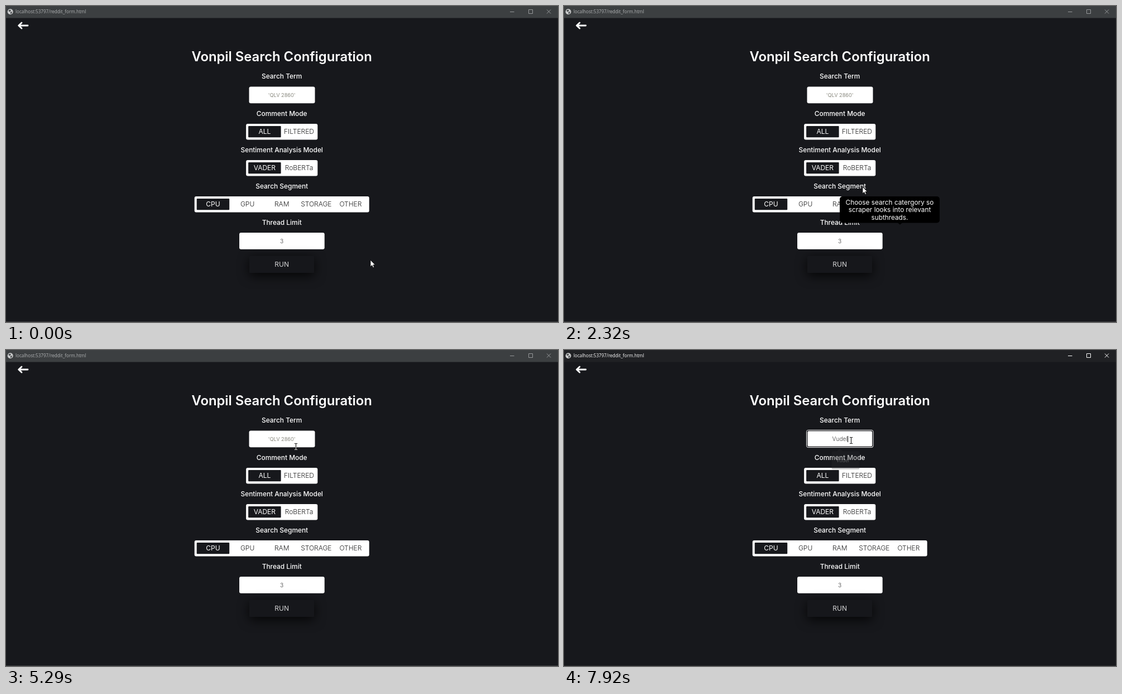
Write an HTML page that moves like this. It is 989 px wide and 566 px high and loops after 8000 ms.

```html
<!DOCTYPE html>
<html lang="en">
<head>
<meta charset="utf-8">
<title>Search form</title>
<style>
  html, body { margin: 0; width: 100%; height: 100%; overflow: hidden; background: #17181c; }
  svg { display: block; width: 100%; height: 100%; }
  text { font: 12px Inter, sans-serif; fill: #fff; text-anchor: middle; white-space: pre; }
  .title { font-size: 23.8px; font-weight: 600; }
  .label { font-weight: 500; font-size: 11.9px; }
  .option { font-weight: 300; fill: #222; }
  .hint { font-size: 9.2px; fill: #89897f; }
  .value { font-size: 10px; fill: #666; }
  .tip text { font-size: 11.8px; }
  .system, .popup text { font: 500 8.1px "Open Sans", sans-serif; text-anchor: start; }
  .popup text { font-size: 8.7px; fill: #f4f5f6; }
  .popup { filter: drop-shadow(0 1px 1px #0004); }
  .run { filter: drop-shadow(0 5px 10px #000c); }
  #beam { mix-blend-mode: difference; }
</style>
</head>
<body>
<svg id="stage" viewBox="0 0 989 566"></svg>
<script>
const LOOP = 8000, CENTER = 494.2, DARK = '#17181c', FOCUS = 5610, BLINK = 510;

const rect = (x, y, w, h, fill, r = 0, extra = '') =>
  `<rect x="${x}" y="${y}" width="${w}" height="${h}" rx="${r}" fill="${fill}" ${extra}/>`;
const text = (x, y, content, cls = '') => `<text x="${x}" y="${y}" class="${cls}">${content}</text>`;

// Segmented control whose first option is selected.
function choice(y, names) {
  const pitch = 61.6, width = pitch * names.length + 5, left = CENTER - width / 2;
  return rect(left, y, width, 28.5, '#fff', 3) +
    rect(left + 4, y + 4, 58.5, 20.2, DARK, 1) +
    names.map((name, i) => text(left + 33.3 + pitch * i, y + 18.2, name, i ? 'option' : '')).join('');
}

function tooltip(y, lines) {
  const height = 6.8 + 13.55 * lines.length;
  return `<g class="tip" visibility="hidden">${rect(494, y, 179, height, '#000', 5)}
    <path d="M598 ${y + height}h8l-4 3z"/>
    ${lines.map((line, i) => text(583.5, y + 14.5 + 13.55 * i, line)).join('')}</g>`;
}

function popup(width, items) {
  return `<g class="popup" visibility="hidden"><path d="M488 182l6-5.5 6 5.5z" fill="#292a2d"/>
    ${rect(479.5, 181.5, width, 6 + 25.75 * items.length, '#292a2d', 2)}
    ${items.map((item, i) => text(488, 200.7 + 25.75 * i, item)).join('')}</g>`;
}

const labels = [[126, 'Search Term'], [192.5, 'Comment Mode'], [257.5, 'Sentiment Analysis Model'],
  [322.5, 'Search Segment'], [387.5, 'Thread Limit']];

document.getElementById('stage').innerHTML = `
  ${rect(0, 0, 989, 566, DARK)}
  ${rect(0, 565, 989, 1, '#3b3c3e', 0, 'id="edge"')}
  ${rect(0, 0, 989, 21.5, '#3c3f41', 0, 'id="bar"')}
  <circle cx="7.7" cy="10.3" r="5" fill="#c9cacb"/>
  <path d="M4 8.5l3-2 2 1.5-2 2.5zM8 11l3-1-1 3.5-2 .5z" fill="#45484a"/>
  <text id="address" class="system" x="17" y="13.3">localhost:53797/reddit_form.html</text>
  <path id="controls" d="M903 10.5h7.5M936.5 6.5h7v7h-7zM969 6.5l7 7M976 6.5l-7 7" fill="none"/>
  <path d="M39 35H23M28 30l-5.3 5 5.3 5" fill="none" stroke="#fff" stroke-width="2.8"
    stroke-linecap="round" stroke-linejoin="round"/>
  ${text(CENTER, 99, 'Vonpil Search Configuration', 'title')}
  ${labels.map(([y, name]) => text(CENTER, y + 4.2, name, 'label')).join('')}
  ${rect(435.5, 144.5, 118, 29.7, '#fff', 3)}
  <g id="ring" fill="none">
    ${rect(434.5, 143.5, 119.5, 31, 'none', 3, 'stroke="#fff"')}
    ${rect(435.7, 144.7, 117.1, 28.6, 'none', 2.5, 'stroke="#101014" stroke-width="1.3"')}
  </g>
  ${text(CENTER, 163, "'QLV 2860'", 'hint')}
  <text id="typed" class="value" x="${CENTER}" y="163.2"></text>
  ${rect(494, 154, 1, 11, '#000', 0, 'id="caret"')}
  ${choice(211, ['ALL', 'FILTERED'])}
  ${choice(276, ['VADER', 'RoBERTa'])}
  ${choice(341, ['CPU', 'GPU', 'RAM', 'STORAGE', 'OTHER'])}
  ${rect(418, 406, 152.7, 29.8, '#fff', 3)}
  ${text(CENTER, 424.8, '3', 'value')}
  ${rect(436, 447.5, 116, 30.5, '#16171b', 1, 'class="run"')}
  <text x="${CENTER}" y="467" style="fill:#d5d5d6">RUN</text>
  ${tooltip(211, ['Choose to analyse all the', 'comments found or only', 'the ones that mention', 'the search term.'])}
  ${tooltip(276, ['Choose the model used to', 'score each comment.', 'VADER is rule based and', 'gives quick results for',
    'short and simple text.', 'RoBERTa is a pretrained', 'language model which is', 'slower to run but more', 'accurate overall.'])}
  ${tooltip(341, ['Choose search catergory so', 'scraper looks into relevant', 'subthreads.'])}
  ${popup(102.3, ['Torvale', 'qlv 5160', 'vjq', 'Melvaro', '7240k6b', 'k neo v featherfit'])}
  ${popup(88, ['Vudel', 'vent fan', 'vinyl', 'velvet cloth', 'visor'])}
  ${popup(50, ['Vudel'])}
  <path id="arrow" d="M0 0V12L2.8 9.4 4.7 13.6 6.6 12.8 4.8 8.7H8.4Z" fill="#fff" stroke="#000" stroke-width=".7"/>
  <path id="beam" d="M-2.5-5.5h2l.5.5.5-.5h2M0-5V5M-2.5 5.5h2L0 5l.5.5h2" fill="none" stroke="#fff"/>`;

const byId = id => document.getElementById(id);
const bar = byId('bar'), edge = byId('edge'), address = byId('address'), controls = byId('controls'),
  ring = byId('ring'), typed = byId('typed'), caret = byId('caret'), arrow = byId('arrow'),
  beam = byId('beam'), hint = document.querySelector('.hint'),
  tips = document.querySelectorAll('.tip'), popups = document.querySelectorAll('.popup');

// Pointer stops: time, x, y.
const path = [[0, 653, 455], [500, 653, 455], [650, 646, 478], [1130, 570, 334], [1300, 546, 314],
  [1330, 545, 314], [1600, 535, 324], [2320, 535, 324], [2920, 537, 258], [3860, 537, 258],
  [3980, 535, 235], [4430, 534, 193], [5170, 534, 193], [5290, 519.5, 173], [5600, 514.5, 162],
  [LOOP, 514.5, 162]];
const keys = [6840, 7210, 7520, 7660, 7790];
const popupTimes = [5680, 6940, 7310, LOOP];

const show = (node, on) => node.setAttribute('visibility', on ? 'visible' : 'hidden');

function pointerAt(t) {
  const i = path.findIndex(stop => stop[0] > t);
  const [t0, x0, y0] = path[i - 1], [t1, x1, y1] = path[i];
  const k = (t - t0) / (t1 - t0);
  return [x0 + (x1 - x0) * k, y0 + (y1 - y0) * k];
}

function draw(t) {
  const [x, y] = pointerAt(t), inField = y < 174;
  for (const node of [arrow, beam]) node.setAttribute('transform', `translate(${x} ${y})`);
  show(arrow, !inField);
  show(beam, inField);
  tips.forEach((tip, i) => show(tip, x < 565 && Math.abs(y - labels[i + 1][0]) < 9));

  const focused = t >= FOCUS;
  bar.setAttribute('fill', focused ? '#202124' : '#3c3f41');
  edge.setAttribute('fill', focused ? '#27282b' : '#3b3c3e');
  address.style.fill = focused ? '#fff' : '#b0b2b4';
  controls.setAttribute('stroke', focused ? '#fff' : '#96989a');
  show(ring, focused);

  const pressed = keys.filter(time => time <= t);
  typed.textContent = 'Vudel'.slice(0, pressed.length);
  show(hint, !pressed.length);
  const since = pressed.length ? pressed[pressed.length - 1] : FOCUS;
  show(caret, focused && Math.floor((t - since) / BLINK) % 2 === 0);
  caret.setAttribute('x', Math.round(CENTER + typed.getComputedTextLength() / 2));

  popups.forEach((node, i) => show(node, t >= popupTimes[i] && t < popupTimes[i + 1]));
  popups[2].style.opacity = 1 - 0.7 * Math.min(1, Math.max(0, (t - 7790) / 130));
}

const start = performance.now();
function tick() {
  draw((performance.now() - start) % LOOP);
  requestAnimationFrame(tick);
}
tick();
</script>
</body>
</html>
```
